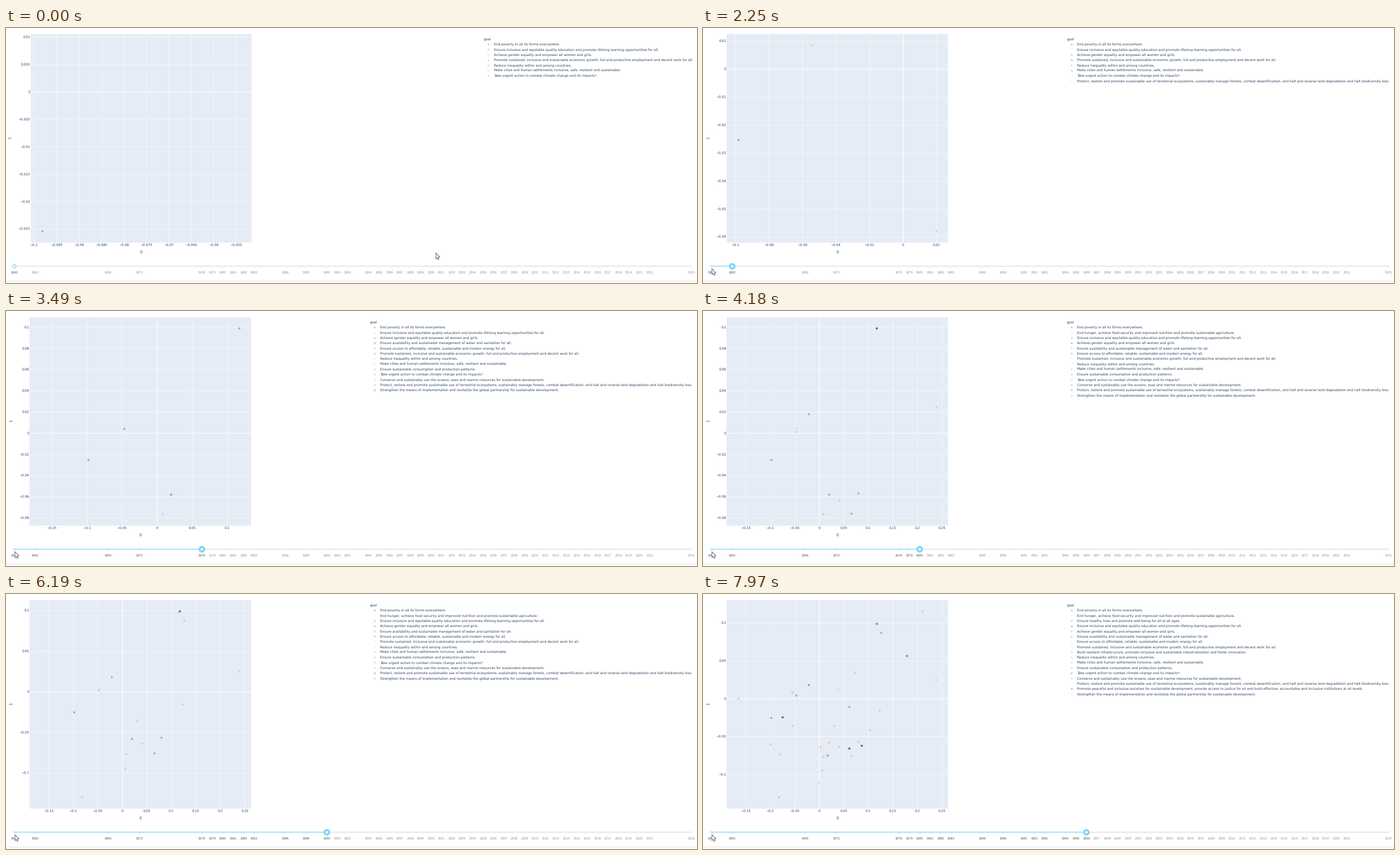
Recreate the animation shown at these times as a matplotlib script. Size 1232 by 455 pixels, loop 8 s.

```python
import math

import numpy as np
import matplotlib.pyplot as plt
from matplotlib.animation import FuncAnimation
from matplotlib.patches import Circle, Polygon, Rectangle

W, H, DPI = 1232, 455, 64
PT = 72 / DPI
STEP, LOOP = 50, 8000
INK = "#2a3f5f"

plt.rcParams["text.hinting"] = "none"
plt.rcParams["font.family"] = "DejaVu Sans"

YEARS = [1960, 1962, 1969, 1972, *range(1978, 1984), 1986, 1988,
         *range(1990, 1993), *range(1994, 2022), 2025]

# (slider moves, chart follows, year)
EVENTS = [
    (0, 0, 1960), (2100, 2250, 1962), (2410, 2560, 1969), (2870, 3020, 1972),
    (3410, 3560, 1978), (3720, 3870, 1979), (4030, 4180, 1980),
    (4490, 4570, 1981), (4870, 4950, 1982), (5260, 5340, 1983),
    (5490, 5640, 1986), (5800, 5880, 1988), (6110, 6190, 1990),
    (6340, 6490, 1991), (6810, 6960, 1992), (7190, 7350, 1994),
    (7510, 7660, 1995), (7820, 7970, 1996),
]

# first year shown, goal
GOALS = [
    (1960, "End poverty in all its forms everywhere."),
    (1979, "End hunger, achieve food security and improved nutrition and "
           "promote sustainable agriculture."),
    (1995, "Ensure healthy lives and promote well-being for all at all ages."),
    (1960, "Ensure inclusive and equitable quality education and promote "
           "lifelong learning opportunities for all."),
    (1960, "Achieve gender equality and empower all women and girls."),
    (1972, "Ensure availability and sustainable management of water and "
           "sanitation for all."),
    (1972, "Ensure access to affordable, reliable, sustainable and modern "
           "energy for all."),
    (1960, "Promote sustained, inclusive and sustainable economic growth, "
           "full and productive employment and decent work for all."),
    (1991, "Build resilient infrastructure, promote inclusive and sustainable "
           "industrialization and foster innovation."),
    (1960, "Reduce inequality within and among countries."),
    (1960, "Make cities and human settlements inclusive, safe, resilient and "
           "sustainable."),
    (1972, "Ensure sustainable consumption and production patterns."),
    (1960, "Take urgent action to combat climate change and its impacts*."),
    (1972, "Conserve and sustainably use the oceans, seas and marine "
           "resources for sustainable development."),
    (1962, "Protect, restore and promote sustainable use of terrestrial "
           "ecosystems, sustainably manage forests, combat desertification, "
           "and halt and reverse land degradation and halt biodiversity loss."),
    (1991, "Promote peaceful and inclusive societies for sustainable "
           "development, provide access to justice for all and build "
           "effective, accountable and inclusive institutions at all levels."),
    (1972, "Strengthen the means of implementation and revitalize the global "
           "partnership for sustainable development."),
]

# Upper case codes are drawn as hollow squares.
TONES = {
    "b": "#bed4f0", "c": "#cfe6f0", "f": "#8fd3d6", "g": "#a8acc2",
    "i": "#7076ae", "k": "#ebc3cc", "l": "#b0b2dc", "m": "#c5abb8",
    "n": "#cbcfe2", "o": "#dc9a70", "p": "#80607a", "r": "#c6958f",
    "s": "#84bfda", "t": "#c3dbe2", "u": "#faf3df", "v": "#ae7890",
    "w": "#e6ecf4", "x": "#e490be", "y": "#f3c698",
}
ERAS = (1962, 1972, 1978, 1991, 1994)

# first year, x, y, one tone per era up to the last one
POINTS = [
    (1960, -.0982, -.0254, "moggrg"), (1960, -.0542, .0085, "ctwwwL"),
    (1962, .0198, -.058, "trsty"), (1969, -.047, .0042, "ngBfg"),
    (1972, .117, .099, "gpiv"), (1972, .0078, -.0765, "tntn"),
    (1972, -.165, 0, "wwwt"),
    (1978, -.0217, .018, "lir"), (1978, .0405, -.0635, "ntk"),
    (1979, .2385, .0247, "ttt"), (1979, .0795, -.0567, "mtn"),
    (1980, .0655, -.076, "mfn"), (1980, -.048, .0012, "bfw"),
    (1981, .126, .0872, "kts"), (1982, .0303, -.036, "ktn"),
    (1986, .1228, -.0155, "ttn"), (1988, .006, -.0945, "tnn"),
    (1988, -.0825, -.13, "nty"), (1990, .103, -.0415, "ttn"),
    (1991, .1785, .0565, "vv"), (1991, .061, -.0107, "gg"),
    (1992, .0865, -.062, "vp"), (1992, -.0996, -.0605, "xy"),
    (1994, .072, .034, "n"), (1994, -.055, -.036, "n"),
    (1994, .061, -.0657, "p"), (1994, .0025, -.064, "y"),
    (1995, .039, .012, "N"), (1995, -.075, -.0245, "p"),
    (1995, .017, -.075, "r"), (1995, -.08, -.0735, "n"),
    (1996, -.0015, -.111, "N"), (1996, .2105, .1153, "t"),
]

fig = plt.figure(figsize=(W / DPI, H / DPI), dpi=DPI, facecolor="white")
ax = fig.add_axes([0, 0, 1, 1])
ax.set_xlim(0, W)
ax.set_ylim(H, 0)
ax.axis("off")


def label(x, y, s, px=5.88, color=INK, **kw):
    """Text whose digits are centred on y."""
    return ax.text(x, y + .36 * px, s, size=px * PT, color=color,
                   va="baseline", **kw)


def dots(xs, ys, codes, px, alpha=1):
    """Soft markers, filled circles or hollow squares."""
    out = []
    for hollow in (False, True):
        pick = [i for i, c in enumerate(codes) if c.isupper() == hollow]
        if not pick:
            continue
        tones = [TONES[codes[i].lower()] for i in pick]
        out.append(ax.scatter(
            [xs[i] + .5 for i in pick], [ys[i] + .5 for i in pick],
            s=(px * PT) ** 2 * (.8 if hollow else 1),
            marker="s" if hollow else "o", alpha=alpha,
            facecolors="none" if hollow else tones, edgecolors=tones,
            linewidths=.7 * PT if hollow else 0, zorder=4, snap=False))
    return out


def nice_step(span):
    rough = span / 10
    base = 10 ** math.floor(math.log10(rough))
    return next(m * base for m in (1, 2, 5, 10) if m * base >= rough)


def axis(vals, p0, p1, e0, e1):
    """Map the data range to p0..p1; return the map and ticks within e0..e1."""
    lo, hi = min(vals), max(vals)
    k = (p1 - p0) / (hi - lo)

    def to_px(v):
        return p0 + (v - lo) * k

    a, b = lo + (e0 - p0) / k, lo + (e1 - p0) / k
    step = nice_step(b - a)
    ticks = [i * step for i in range(math.ceil(a / step),
                                     math.floor(b / step) + 1)]
    return to_px, ticks


def num(v):
    return f"{round(v, 6):g}".replace("-", "\u2212")


def draw_chart(year):
    first = year == 1960
    left, right = (43.5, 438) if first else (42, 437.3)
    top, low = 10.7, 382.5
    shown = [p for p in POINTS if p[0] <= year]
    xs, ys = [p[1] for p in shown], [p[2] for p in shown]
    fx, xticks = axis(xs, left + 20.8, right - 21.7, left, right)
    fy, yticks = axis(ys, 362.2, 30.6, low, top)

    out = [ax.add_patch(Rectangle((left, top), right - left, low - top,
                                  color="#e5ecf6", lw=0, zorder=1))]
    for v in xticks:
        out.append(label(fx(v), 387, num(v), ha="center"))
    for v in yticks:
        out.append(label(left - .2, fy(v), num(v), ha="right"))
    for zero, color, lw in ((False, "#f7f9fd", .9), (True, "white", 1.2)):
        gx = [fx(v) + .5 for v in xticks if (v == 0) == zero]
        gy = [fy(v) + .5 for v in yticks if (v == 0) == zero]
        style = dict(colors=color, linewidths=lw * PT, zorder=2 + zero,
                     snap=False)
        out.append(ax.vlines(gx, top, low, **style))
        out.append(ax.hlines(gy, left, right, **style))

    era = sum(year >= e for e in ERAS)
    out += dots([fx(x) for x in xs], [fy(y) for y in ys],
                [p[3][era - 6] for p in shown], 3.9)

    out.append(label((left + right) / 2, 399.3, "0", 6.8, ha="center"))
    out.append(ax.text(7.5 if first else 9, 196, "1", size=6.8 * PT, color=INK,
                       rotation=90, ha="center", va="center"))

    x = 869.6 if first else 667
    goals = [g for since, g in GOALS if since <= year]
    rows = [29 + 9.33 * i for i in range(len(goals))]
    out.append(label(x - 18.3, 19.3, "goal", 6.2))
    out += [label(x, y, g) for y, g in zip(rows, goals)]
    codes = "lkckycn" if first else "lufsyfuwkyBysnusw"[:len(rows)]
    return out + dots([x - 10] * len(rows), rows, codes, 3.2, .75)


# Slider
RAIL_Y = 425.2


def year_x(year):
    return 15 + (year - 1960) * 1207 / 65


def bar(x0, x1, color, z):
    return ax.add_patch(Rectangle((x0, RAIL_Y - 1), x1 - x0, 2, color=color,
                                  lw=0, zorder=z))


def disc(r, color, z):
    return ax.add_patch(Circle((15, RAIL_Y), r, color=color, lw=0, zorder=z))


bar(15, 1222, "#e6e8e8", 1)
track = bar(15, 15, "#abe2fb", 2)
stops = ax.scatter([year_x(y) for y in YEARS], [RAIL_Y] * len(YEARS),
                   s=(3 * PT) ** 2, facecolors="white", linewidths=.9 * PT,
                   zorder=3)
marks = [label(year_x(y), 435.4, str(y), 5.75, ha="center",
               family="Liberation Sans") for y in YEARS]
halo = disc(6, "#8ad9fb", 5)
knob = [halo, disc(3.5, "#57c5f7", 6), disc(2.5, "white", 7)]
ax.hlines(450.5, 0, W, colors="#e2e2e2", linewidths=PT, zorder=1)

ARROW = np.array([(.4, .4), (.4, 11), (2.7, 8.9), (4.3, 12.3), (5.9, 11.6),
                  (4.5, 8.2), (7.6, 7.9)])
cursor = ax.add_patch(Polygon(ARROW, fc="white", ec="#333344", lw=.75 * PT,
                              joinstyle="miter", zorder=10))


def set_slider(year):
    x = year_x(year)
    track.set_width(x - 15)
    for part in knob:
        part.center = (x, RAIL_Y)
    halo.set_visible(year > 1960)
    stops.set_edgecolors(["#8ad7f8" if y <= year else "#e6e8e8"
                          for y in YEARS])
    for y, mark in zip(YEARS, marks):
        mark.set_color("#555555" if y <= year else "#939393")


def ease(t, t0, t1):
    u = min(max((t - t0) / (t1 - t0), 0), 1)
    return u * u * (3 - 2 * u)


def cursor_at(t):
    u, v = ease(t, 70, 930), ease(t, 1320, 1470)
    x = 766 - 760 * u + 9.5 * v
    y = 401 + 20 * u - 244 * u * (1 - u) + 8 * v
    return x, y


now = {"slider": None, "chart": None, "parts": []}


def update(i):
    t = i * STEP + 30
    slider = max(y for s, _, y in EVENTS if s <= t)
    chart = max(y for _, c, y in EVENTS if c <= t)
    if slider != now["slider"]:
        set_slider(slider)
        now["slider"] = slider
    if chart != now["chart"]:
        for part in now["parts"]:
            part.remove()
        now["parts"] = draw_chart(chart)
        now["chart"] = chart
    cursor.set_xy(ARROW + cursor_at(t))
    return []


anim = FuncAnimation(fig, update, frames=LOOP // STEP, interval=STEP,
                     repeat=True, repeat_delay=0)
plt.show()
```
